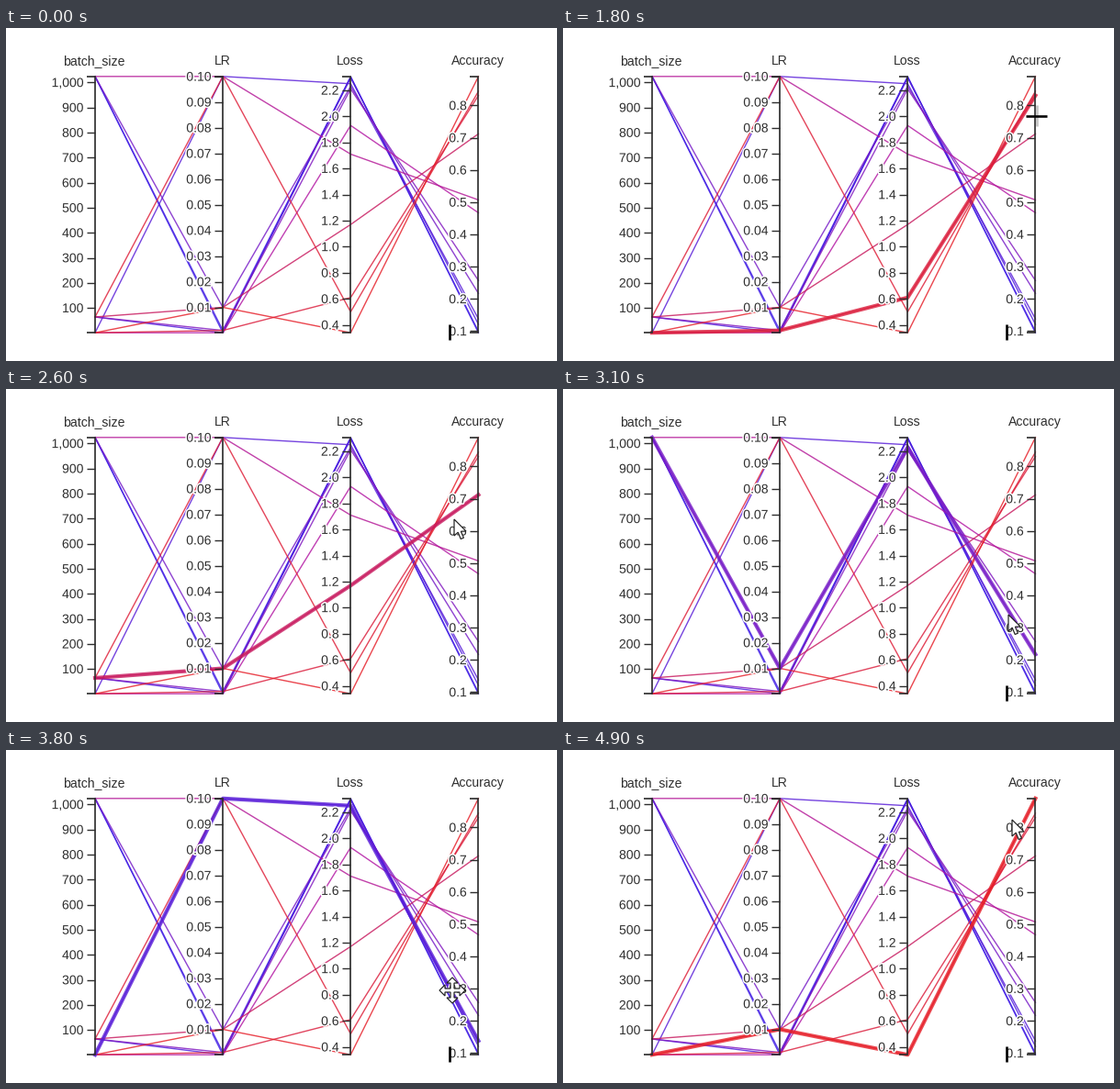
Animation, 600 px wide and 363 px high, one loop 5 s. Source, as a matplotlib script:

```python
import colorsys
from itertools import product

import numpy as np
import matplotlib.pyplot as plt
from matplotlib.animation import FuncAnimation
from matplotlib.patches import Polygon
from matplotlib.patheffects import withStroke

W, H, DPI = 600, 363, 64
PX = 72 / DPI                      # points per pixel
FRAMES, STEP = 50, 100
TOP, BOTTOM = 52.8, 332.2
INK = "#2e2e2e"

plt.rcParams["font.family"] = "Liberation Sans"
fig = plt.figure(figsize=(W / DPI, H / DPI), dpi=DPI, facecolor="white")
ax = fig.add_axes([0, 0, 1, 1])
ax.set_xlim(0, W)
ax.set_ylim(H, 0)
ax.axis("off")

# title, low, high, ticks, label format
AXES = [
    ("batch_size", 1, 1024, np.arange(100, 1001, 100), "{:,.0f}"),
    ("LR", 0.0001, 0.1, np.arange(1, 11) / 100, "{:.2f}"),
    ("Loss", 0.34, 2.306, np.arange(2, 12) / 5, "{:.1f}"),
    ("Accuracy", 0.095, 0.89, np.arange(1, 9) / 10, "{:.1f}"),
]
XS = 97 + 139.15 * np.arange(4)

# (loss, accuracy) for every batch size and learning rate
SETTINGS = product((1, 64, 1024), (0.0001, 0.001, 0.01, 0.1))
RESULTS = [
    (1.93, 0.467), (0.61, 0.831), (0.34, 0.890), (2.25, 0.138),
    (2.295, 0.121), (2.21, 0.257), (1.17, 0.712), (0.50, 0.844),
    (2.305, 0.095), (2.302, 0.099), (2.23, 0.217), (1.71, 0.507),
]
RUNS = [s + r for s, r in zip(SETTINGS, RESULTS)]
RUNS.sort(key=lambda run: run[3])


def scale(k, v):
    low, high = AXES[k][1:3]
    return BOTTOM - (v - low) / (high - low) * (BOTTOM - TOP)


def shade(acc):
    """Blue through violet to red as accuracy rises."""
    low, high = AXES[3][1:3]
    u = ((acc - low) / (high - low)) ** 0.85
    return colorsys.hsv_to_rgb((250 + 107 * u) / 360, 0.87,
                               0.9 - 0.2 * np.sin(np.pi * u))


PATHS = [np.array([scale(k, v) for k, v in enumerate(run)]) for run in RUNS]
COLORS = [shade(run[3]) for run in RUNS]

for ys, color in zip(PATHS, COLORS):
    ax.plot(XS, ys, color=color, lw=1.4 * PX, alpha=0.82, zorder=2)

halo = [withStroke(linewidth=3 * PX, foreground="white")]
for k, (title, _, _, ticks, form) in enumerate(AXES):
    x = XS[k]
    ax.plot([x - 9, x, x, x - 9], [TOP, TOP, BOTTOM, BOTTOM], color=INK,
            lw=1.7 * PX, solid_joinstyle="miter", solid_capstyle="butt", zorder=4)
    for v in ticks:
        y = scale(k, v)
        ax.plot([x - 9, x], [y, y], color=INK, lw=1.4 * PX,
                solid_capstyle="butt", zorder=4)
        ax.text(x - 12.7, y + 4.8, form.format(v), ha="right", va="baseline",
                size=14 * PX, color=INK, path_effects=halo, zorder=5)
    ax.text(x - 0.8, 40, title, ha="center", va="baseline",
            size=14 * PX, color=INK, zorder=5)

# moving parts
glow, = ax.plot([], [], lw=4.2 * PX, alpha=0.8, solid_joinstyle="round", zorder=3)
caret, = ax.plot([483, 483], [323, 339.5], color="black", lw=2.6 * PX,
                 solid_capstyle="butt", zorder=6)

ARROW = np.array([(0, 0), (0, 18), (4.2, 14.2), (7.2, 21.5), (10.4, 20.2),
                  (7.4, 13.2), (13, 13)])
HEAD = [(-2, -2), (-2, -8), (-6, -8), (0, -14), (6, -8), (2, -8)]
MOVE = np.array([(x * c - y * s, x * s + y * c)
                 for c, s in [(1, 0), (0, 1), (-1, 0), (0, -1)] for x, y in HEAD])


def pointer(shape):
    return ax.add_patch(Polygon(shape, closed=True, fc="white", ec="#222222",
                                lw=1.2 * PX, joinstyle="miter", zorder=8))


arrow, move = pointer(ARROW), pointer(MOVE)
cross_v, = ax.plot([], [], lw=2.6 * PX, solid_capstyle="butt", zorder=8)
cross_h, = ax.plot([], [], color="black", lw=2.6 * PX, solid_capstyle="butt", zorder=8)

# pointer stops: time, x, y
STOPS = np.array([
    (1200, 169, 319), (1800, 515.5, 95.5), (2100, 518, 58), (2600, 488, 142),
    (3100, 485, 246), (3800, 486, 262), (4100, 486, 284), (4700, 477, 98),
    (4800, 500, 65), (4900, 489, 76),
])


def pointer_at(t):
    """Glide from stop to stop, easing in and out."""
    k = np.clip(np.searchsorted(STOPS[:, 0], t, "right") - 1, 0, len(STOPS) - 2)
    (t0, *a), (t1, *b) = STOPS[k], STOPS[k + 1]
    u = np.clip((t - t0) / (t1 - t0), 0, 1)
    u = u * u * (3 - 2 * u)
    return np.array(a) * (1 - u) + np.array(b) * u


def caret_on(t):
    """Lit until the first blink, then a steady 530 ms on, 530 ms off."""
    return t < 700 or (t > 1640 and (t - 1640) // 530 % 2 == 0)


def distance(p, ys):
    """Distance from point p to a polyline over the four axes."""
    pts = np.column_stack([XS, ys])
    a, d = pts[:-1], np.diff(pts, axis=0)
    t = np.clip(((p - a) * d).sum(1) / (d * d).sum(1), 0, 1)
    return np.hypot(*(a + t[:, None] * d - p).T).min()


def cursor_kind(x, y):
    """Crosshair on an axis, move cross on a tick label, arrow elsewhere."""
    if np.abs(XS - x).min() < 12:
        return "cross"
    for k, axis in enumerate(AXES):
        on_label = np.abs(scale(k, axis[3]) - y).min() < 7
        if XS[k] - 38 < x < XS[k] - 12 and on_label:
            return "move"
    return "arrow"


def update(i):
    t = i * STEP
    caret.set_visible(caret_on(t))

    x, y = spot = pointer_at(t)
    kind = cursor_kind(x, y) if t >= 1200 else None
    arrow.set_visible(kind == "arrow")
    move.set_visible(kind == "move")
    cross_h.set_visible(kind == "cross")
    cross_v.set_visible(kind == "cross")
    arrow.set_xy(ARROW + spot)
    move.set_xy(MOVE + spot)
    cross_h.set_data([x - 11.5, x + 11.5], [y, y])
    cross_v.set_data([x, x], [y - 11.5, y + 11.5])
    cross_v.set_color("#c4c4c4" if np.abs(XS - x).min() < 1.5 else "black")

    # the run nearest to the pointer lights up
    best = int(np.argmin([distance(spot, ys) for ys in PATHS]))
    glow.set_visible(t > 1200)
    glow.set_data(XS, PATHS[best])
    glow.set_color(COLORS[best])
    return glow, caret, arrow, move, cross_h, cross_v


anim = FuncAnimation(fig, update, frames=FRAMES, interval=STEP,
                     init_func=lambda: update(0), repeat=True, repeat_delay=0)
plt.show()
```
